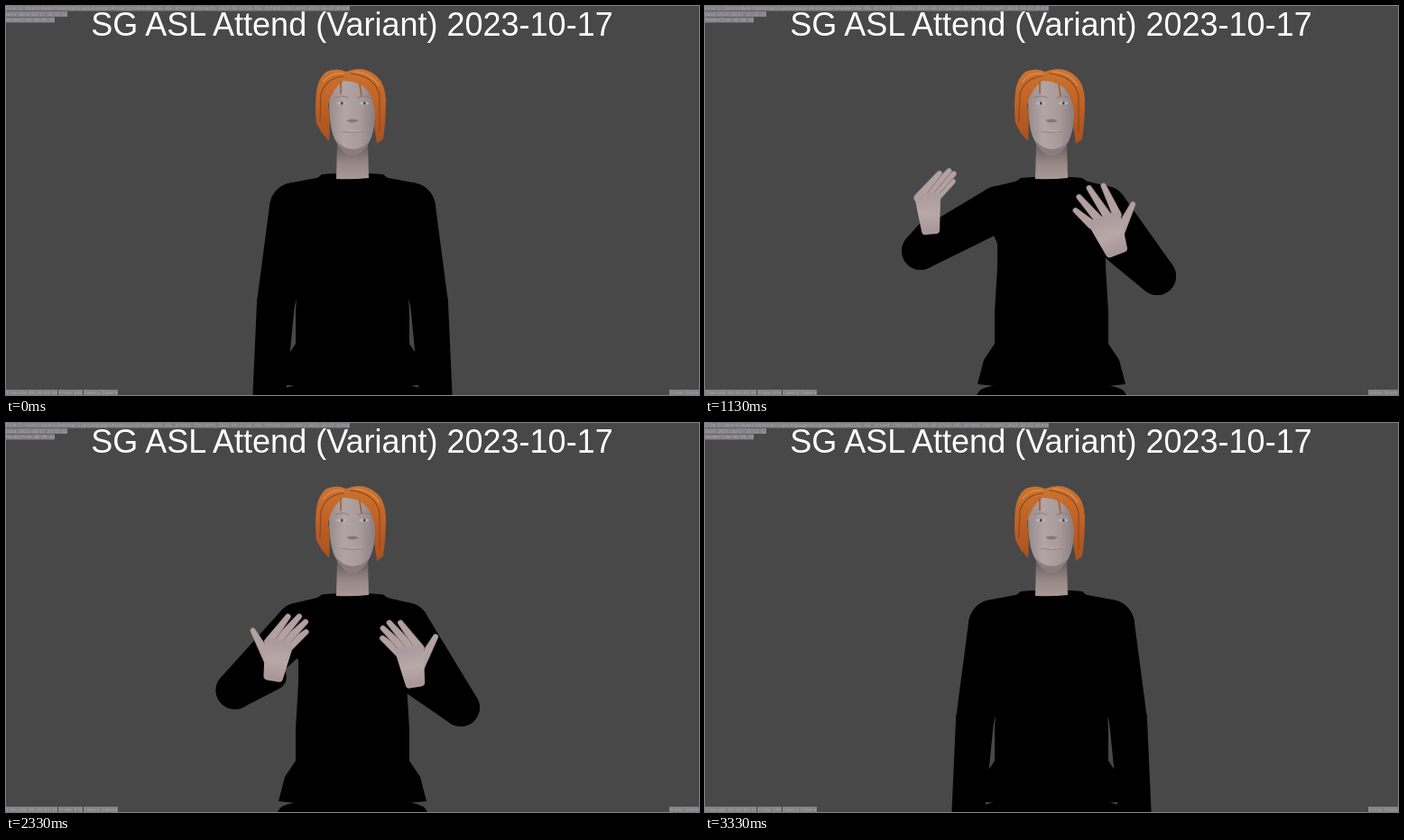
An HTML page with a canvas for the animation above (3390 ms loop, 768 px wide and 432 px high).

```html
<!DOCTYPE html>
<html lang="en">
<head>
<meta charset="utf-8">
<title>SG ASL Attend (Variant)</title>
<style>
html, body { margin: 0; width: 100%; height: 100%; overflow: hidden; background: #484849; }
canvas, svg { position: absolute; left: 0; top: 0; width: 768px; height: 432px; }
.title { font: 36px "Liberation Sans", Arial, sans-serif; fill: #fff; text-anchor: middle; }
.stamp text { font: 4.73px "DejaVu Sans Mono", monospace; fill: #aaa8ab; white-space: pre; }
.stamp rect { fill: #828085; }
</style>
</head>
<body>
<canvas id="stage" width="768" height="432"></canvas>
<svg viewBox="0 0 768 432">
  <g class="stamp">
    <rect width="381" height="5.5"/><rect y="6" width="68" height="6"/><rect y="12.5" width="54" height="6"/>
    <rect y="426" width="57" height="6"/><rect x="58" y="426" width="27" height="6"/>
    <rect x="86" y="426" width="38" height="6"/><rect x="735" y="426" width="33" height="6"/>
    <text x="0" y="4.4">File C:\Users\Owner\Desktop\SignLanguage\Animation\Blender\SG ASL Attend (Variant) 2023-10-17\SG ASL Attend (Variant) 2023-10-17.blend</text>
    <text x="0" y="10.6">Date 2023/10/17 23:15:52</text>
    <text x="0" y="17">RenderTime 00:00.45</text>
    <text x="0" y="430.6" id="code"></text>
    <text x="58.5" y="430.6" id="count"></text>
    <text x="86.5" y="430.6">Camera Camera</text>
    <text x="736" y="430.6">Scene Scene</text>
  </g>
  <text class="title" x="383.5" y="33">SG ASL Attend (Variant) 2023-10-17</text>
</svg>
<script>
const LOOP = 3390, STEP = 200 / 3, MIDDLE = 384;
const ctx = document.getElementById('stage').getContext('2d');
const code = document.getElementById('code'), count = document.getElementById('count');
const EDGE = '#83767b';

// Both arms use the same space: x runs outwards from the body's middle.
// Angles in degrees; roll turns the palm over, reach shortens bent fingers.
const arm = (elbow, wrist, hand) => ({
  ex: elbow[0], ey: elbow[1], wx: wrist[0], wy: wrist[1], fan: 5, reach: 1, roll: 1, ...hand
});
const hanging = arm([85, 330], [93, 442], { palm: 95, aim: 95, thumb: 120, roll: -.6 });
const onChest = { palm: -128, aim: -166, thumb: -80 };

const REST = { lift: 0, arms: [hanging, hanging] };
const OPEN = { lift: 1, arms: [
  arm([106, 261], [153, 303], { palm: -26, aim: -18, thumb: -64, roll: -.6, fan: 14 }),
  arm([98, 288], [92, 342], { palm: -14, aim: 35, thumb: -30, roll: -.8, fan: 25, reach: .55 })
] };
const RAISED = { lift: 1, arms: [
  arm([145, 272], [134, 249], { palm: -85, aim: -134, thumb: -110, roll: .7, fan: 3 }),
  arm([117, 300], [72, 272], { palm: -111, aim: -127, thumb: -57, fan: 8 })
] };
const CHEST = { lift: 1, arms: [
  arm([137, 292], [87, 259], onChest),
  arm([125, 314], [66, 267], onChest)
] };

const smooth = u => u * u * (3 - 2 * u);
const easeIn = u => u ** 1.5;
const easeOut = u => 1 - (1 - u) ** 2;
const linear = u => u;
// Step reached, pose, easing on the way to it
const KEYS = [
  [0, REST], [3, REST, linear], [11, OPEN, easeIn], [17, RAISED, linear],
  [24, CHEST, easeOut], [33, CHEST, linear], [42, REST, smooth], [51, REST, linear]
];
const BLINKS = [11, 24, 40];

const mix = (a, b, u) => a + (b - a) * u;
const blend = (a, b, u) => Object.fromEntries(Object.keys(a).map(k => [k, mix(a[k], b[k], u)]));

function poseAt(step) {
  const k = KEYS.findIndex(key => key[0] > step);
  const [t0, a] = KEYS[k - 1], [t1, b, ease] = KEYS[k];
  const u = ease((step - t0) / (t1 - t0));
  return { lift: mix(a.lift, b.lift, u), arms: a.arms.map((from, s) => blend(from, b.arms[s], u)) };
}

function polar([x, y], degrees, length) {
  const a = degrees * Math.PI / 180;
  return [x + Math.cos(a) * length, y + Math.sin(a) * length];
}

function fill(d, color) {
  ctx.fillStyle = color;
  ctx.fill(new Path2D(d));
}

function line(d, color, width) {
  ctx.strokeStyle = color;
  ctx.lineWidth = width;
  ctx.stroke(new Path2D(d));
}

function gradient(x0, y0, x1, y1, ...colors) {
  const g = ctx.createLinearGradient(x0, y0, x1, y1);
  colors.forEach((c, i) => g.addColorStop(i / (colors.length - 1), c));
  return g;
}

// Side -1 is the left half of the picture, 1 the right
function onSide(side, paint) {
  ctx.save();
  ctx.translate(MIDDLE, 0);
  ctx.scale(side, 1);
  paint();
  ctx.restore();
}

// Tapered capsule between two circles
function limb([ax, ay], ra, [bx, by], rb, color) {
  const dir = Math.atan2(by - ay, bx - ax);
  const ratio = (ra - rb) / (Math.hypot(bx - ax, by - ay) || 1);
  const off = Math.acos(Math.max(-1, Math.min(1, ratio)));
  ctx.beginPath();
  ctx.arc(ax, ay, ra, dir + off, dir - off + 2 * Math.PI);
  ctx.arc(bx, by, rb, dir - off, dir + off);
  ctx.closePath();
  ctx.fillStyle = color;
  ctx.fill();
}

function drawTorso(lift) {
  const y = 186 + 4 * lift;
  fill(`M-1 ${y} H22 L34 ${y + 1} L66 214 V250 L60 264 V290 L63 340 V375 L75 393 L82 420
    Q40 425 -1 425 Z`, '#000');
  fill('M-1 422 H66 Q80 424 83 432 H-1 Z', '#000');
}

function drawSleeve(a, lift) {
  const shoulder = [mix(64, 59, lift), 224 + lift], r = mix(28, 25, lift);
  const elbow = [a.ex, a.ey];
  limb([22, 206 + 3 * lift], 18, shoulder, r, '#000');
  limb(shoulder, r, elbow, 21, '#000');
  limb(elbow, 21, [a.wx, a.wy], mix(18, 14, lift), '#000');
}

function drawFinger(base, r, tip) {
  limb(base, r + .7, tip, 3.2, EDGE);
  limb(base, r, tip, 2.5, '#b3a1a2');
}

function drawHand(a) {
  const wrist = [a.wx, a.wy];
  const across = (p, d) => polar(p, a.palm + 90, d * a.roll);
  const knuckles = polar(wrist, a.palm, 37);

  drawFinger(across(polar(wrist, a.palm, 14), 6), 6, polar(polar(wrist, a.palm, 16), a.thumb, 44));
  for (let f = 3; f >= 0; f--) {
    const place = 1.5 - f;
    const length = 40 * a.reach * (1 - .1 * (f - 1) ** 2);
    const base = across(knuckles, place * 10);
    drawFinger(base, 4.5, polar(base, a.aim + place * a.fan * a.roll, length));
  }

  ctx.fillStyle = ctx.strokeStyle = gradient(...wrist, ...knuckles, '#a8989a', '#b9a8a7', '#ac9c9f');
  ctx.lineWidth = 9;
  ctx.beginPath();
  for (const p of [across(wrist, 8), across(knuckles, 14), across(knuckles, -14), across(wrist, -8)]) ctx.lineTo(...p);
  ctx.closePath();
  ctx.fill();
  ctx.stroke();
}

function drawHead(shut) {
  fill('M367 150 L366 192 Q384 193 402 191 L401 150 Z', gradient(0, 158, 0, 192, '#6f6464', '#988987', '#a79894'));
  fill('M358 90 Q357 132 364 147 Q373 165 384 166 Q395 165 403 150 Q410 136 410 105 Q406 80 381 78 Q360 80 358 90 Z',
    gradient(357, 0, 412, 0, '#978a8d', '#b2a5a5', '#a7999a', '#84787c'));
  fill('M364 147 Q373 165 384 166 Q395 165 403 150 Q394 159 384 159 Q373 159 364 147 Z', '#897c7f');

  for (const x of [372, 397]) {
    line(`M${x - 7} 102 q7 -4 14 0`, '#8f7d78', 1.2);
    if (shut) {
      line(`M${x - 6} 108 q6 3 12 0`, '#8a7d80', 1);
    } else {
      fill(`M${x - 6} 108 q6 -4 12 0 q-6 4 -12 0 Z`, '#bcb4b6');
      fill(`M${x - 1} 106.5 h2.5 v3 h-2.5 Z`, '#48424a');
    }
  }
  fill('M377 127 Q384 124 391 127 Q384 132 377 127 Z', '#83777a');
  fill('M373 139 Q384 135 396 139 Q385 145 373 139 Z', '#b7a4a1');
  line('M373 139.5 Q384 142 396 139.5', '#928283', 1);

  fill(`M377 73 Q367 68 355 73 Q346 80 344 95 Q342 112 344 130 L350 141 L358 150
    Q360 126 357 110 Q361 92 374 83 Q399 84 405 102 Q411 116 408 132
    L411 153 L418 148 Q421 128 421 104 Q420 87 412 79 Q397 65 377 73 Z`,
    gradient(0, 70, 0, 152, '#cc7430', '#bd6025', '#a9511f'));
  line('M374 78 Q354 80 349 98 L348 128 M382 75 Q410 78 414 100 V140', '#8f481d', 1.2);
  line('M374 75 Q360 73 352 84 M386 73 Q404 74 413 88', '#d88a4a', 1.6);
  line('M371 84 L371 97 M392 87 L394 100', '#a9571f', 1.5);
}

const pad = (n, size) => String(n).padStart(size, '0');

function draw(time) {
  const step = Math.min(50, Math.floor((time % LOOP + 3.5) / STEP));
  const { lift, arms } = poseAt(step);
  const sides = [-1, 1];

  ctx.fillStyle = '#484849';
  ctx.fillRect(0, 0, 768, 432);
  ctx.lineJoin = ctx.lineCap = 'round';
  sides.forEach((side, i) => onSide(side, () => {
    drawTorso(lift);
    drawSleeve(arms[i], lift);
  }));
  drawHead(BLINKS.some(b => Math.abs(b - step) <= 1));
  sides.forEach((side, i) => onSide(side, () => drawHand(arms[i])));

  const frame = step * 2;
  code.textContent = `Timecode 00:00:${pad(Math.floor(frame / 30), 2)}:${pad(frame % 30, 2)}`;
  count.textContent = `Frame ${pad(frame, 3)}`;
}

const start = performance.now();
function loop() {
  draw(performance.now() - start);
  requestAnimationFrame(loop);
}
loop();
</script>
</body>
</html>
```
